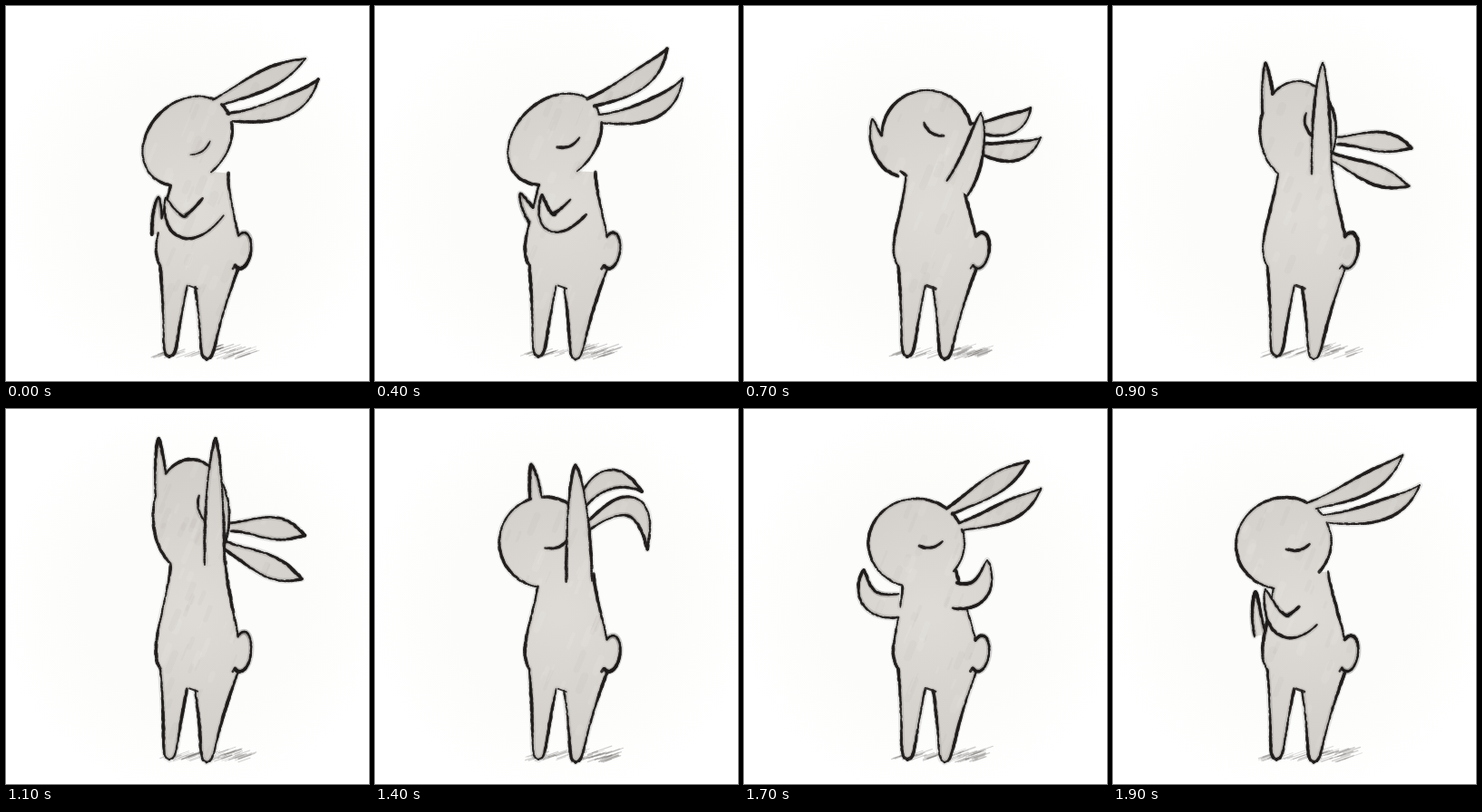
An HTML page with a canvas that plays this animation: 400x414 px, repeating every 2 s.

```html
<!DOCTYPE html>
<html lang="en">
<head>
<meta charset="utf-8">
<title>Stretching rabbit</title>
<style>
html, body { margin: 0; width: 100%; height: 100%; overflow: hidden; background: #fff; }
canvas { display: block; }
</style>
</head>
<body>
<canvas id="stage" width="400" height="414"></canvas>
<script>
const ctx = document.getElementById('stage').getContext('2d');

// head: x, y, radii, tilt    eye: offset from head, angle    neck: x
// earAngle: first ear's place on the head    ears: tip x, y, sag
// arms: shoulder, elbow, hand, width
const praying = {
  head: [200, 149, 55, 43, -0.78], eye: [14, 8, -0.6], neck: [215],
  earAngle: [-1.03], farEar: [330, 58, 2], nearEar: [344, 81, 20],
  farArm: [167, 252, 166, 230, 168, 211, 6], nearArm: [228, 222, 190, 270, 176, 212, 15]
};
const opening = {
  head: [198, 147, 58, 43, -0.75], eye: [15, 4, -0.4], neck: [213],
  earAngle: [-0.95], farEar: [322, 47, 16], nearEar: [339, 80, 24],
  farArm: [178, 238, 168, 226, 160, 207, 7], nearArm: [224, 222, 186, 262, 184, 209, 12]
};
const spread = {
  head: [200, 146, 55, 46, 0.7], eye: [4, -6, 0.1], neck: [206],
  earAngle: [-0.5], farEar: [307, 83, 27], nearEar: [327, 110, 27],
  farArm: [174, 212, 130, 217, 124, 166, 14], nearArm: [238, 212, 272, 207, 281, 155, 16]
};
const reaching = {
  head: [204, 138, 42, 55, 0], eye: [12, -7, 1.3], neck: [212],
  earAngle: [0.24], farEar: [329, 157, -5], nearEar: [326, 199, 2],
  farArm: [172, 125, 170, 95, 168, 63, 7], nearArm: [230, 185, 229, 120, 231, 63, 11]
};
const lowering = {
  head: [187, 147, 50, 50, 0], eye: [13, 2, -0.35], neck: [211],
  earAngle: [-0.72], farEar: [294, 91, -34], nearEar: [300, 155, -55],
  farArm: [178, 112, 177, 88, 172, 61, 7], nearArm: [225, 190, 224, 120, 221, 62, 14]
};
const closing = {
  head: [190, 148, 53, 49, 0], eye: [16, 1, -0.2], neck: [204],
  earAngle: [-0.8], farEar: [313, 58, 2], nearEar: [327, 88, 10],
  farArm: [172, 217, 128, 223, 132, 178, 13], nearArm: [232, 206, 268, 212, 268, 167, 14]
};
const folding = {
  head: [188, 148, 53, 50, -0.4], eye: [16, 4, -0.22], neck: [207],
  earAngle: [-1.05], farEar: [319, 51, 12], nearEar: [338, 84, 18],
  farArm: [162, 250, 157, 228, 157, 202, 6], nearArm: [215, 228, 181, 262, 168, 199, 14]
};

const mix = (a, b, t) => Object.fromEntries(Object.keys(a).map(key =>
  [key, a[key].map((v, i) => v + (b[key][i] - v) * t)]));

// Start time, pose, upward stretch of the body.
const timeline = [
  [0, praying, 1],
  [200, mix(praying, opening, 0.5), 1],
  [400, opening, 1],
  [500, mix(opening, spread, 0.5), 1],
  [600, spread, 1],
  [700, mix(spread, reaching, 0.4), 1],
  [800, mix(spread, reaching, 0.75), 1],
  [900, reaching, 1],
  [1100, reaching, 1.14],
  [1300, mix(reaching, lowering, 0.6), 1.05],
  [1400, lowering, 1],
  [1500, mix(lowering, closing, 0.35), 1],
  [1600, mix(lowering, closing, 0.7), 1],
  [1700, closing, 1],
  [1800, mix(closing, folding, 0.5), 1],
  [1900, folding, 1]
];

function seeded(seed) {
  return () => {
    seed = (seed * 16807) % 2147483647;
    return seed / 2147483647;
  };
}

function bezier(points, t) {
  while (points.length > 1) {
    points = points.slice(1).map((p, i) => p.map((v, k) => points[i][k] + (v - points[i][k]) * t));
  }
  return points[0];
}

// Outline of a limb: a curved spine with a half-width at each t, open at its base.
function tube(spine, halfWidth, steps = 50) {
  const near = [], far = [];
  for (let i = 0; i <= steps; i++) {
    const t = i / steps;
    const [x, y] = bezier(spine, t);
    const [x1, y1] = bezier(spine, t - 0.001), [x2, y2] = bezier(spine, t + 0.001);
    const scale = halfWidth(t) / Math.hypot(x2 - x1, y2 - y1);
    const nx = (y2 - y1) * scale, ny = (x1 - x2) * scale;
    near.push([x + nx, y + ny]);
    far.unshift([x - nx, y - ny]);
  }
  return [...near, ...far];
}

function ellipse(x, y, rx, ry, tilt, steps = 120) {
  return Array.from({ length: steps + 1 }, (_, i) => {
    const a = i / steps * 2 * Math.PI;
    const u = rx * Math.cos(a), v = ry * Math.sin(a);
    return [x + u * Math.cos(tilt) - v * Math.sin(tilt), y + u * Math.sin(tilt) + v * Math.cos(tilt)];
  });
}

function arm([x1, y1, x2, y2, x3, y3, width]) {
  return tube([[x1, y1], [x2, y2], [x3, y3]], t => width * (1 - t * t) ** 0.7);
}

function ear([headX, headY], angle, [tipX, tipY, sag]) {
  const x = headX + 45 * Math.cos(angle), y = headY + 45 * Math.sin(angle);
  const dx = tipX - x, dy = tipY - y, length = Math.hypot(dx, dy);
  const bent = (t, amount) => [x + dx * t - dy / length * amount, y + dy * t + dx / length * amount];
  return tube([[x, y], bent(0.33, sag * 0.7), bent(0.7, sag * 1.2), [tipX, tipY]],
    t => 4 * (1 - t) + 9 * Math.sin(Math.PI * t ** 1.4));
}

function leg(hip, foot, thigh) {
  return tube([hip, foot], t => (7 + thigh * (1 - t) ** 1.5) * (1 - t ** 16) ** 0.5);
}

function eyeLine([headX, headY], [dx, dy, angle]) {
  return Array.from({ length: 14 }, (_, i) => {
    const u = i * 2 - 13, v = 4 - u * u / 40;
    return [headX + dx + u * Math.cos(angle) - v * Math.sin(angle),
      headY + dy + u * Math.sin(angle) + v * Math.cos(angle)];
  });
}

function buildBody(pose) {
  const [neck] = pose.neck, [angle] = pose.earAngle;
  return [
    arm(pose.farArm),
    ear(pose.head, angle, pose.farEar),
    ear(pose.head, angle + 0.42, pose.nearEar),
    ellipse(260, 270, 10, 20, 0.15),
    leg([187, 288], [180, 387], 10),
    leg([230, 288], [221, 390], 19),
    tube([[neck, 182], [211, 230], [211, 312]], t => (30 + 32 * t ** 1.5) * (1 - t ** 8)),
    ellipse(...pose.head)
  ];
}

function segment([x1, y1], [x2, y2], width, color) {
  ctx.lineWidth = width;
  ctx.strokeStyle = color;
  ctx.beginPath();
  ctx.moveTo(x1, y1);
  ctx.lineTo(x2, y2);
  ctx.stroke();
}

function toPath(line) {
  const path = new Path2D();
  line.forEach(([x, y]) => path.lineTo(x, y));
  path.closePath();
  return path;
}

// Charcoal line with uneven pressure and a soft smear, left out where hidden.
function ink(line, random, weight, hidden = () => false) {
  const phase = random() * 6;
  let run = 0;
  for (let i = 1; i < line.length; i++) {
    const [a, b] = [line[i - 1], line[i]];
    run += Math.hypot(b[0] - a[0], b[1] - a[1]);
    if (hidden((a[0] + b[0]) / 2, (a[1] + b[1]) / 2)) continue;
    const pressure = 0.95 + 0.28 * Math.sin(run * 0.06 + phase) + 0.4 * (random() - 0.5);
    const shift = (random() - 0.5) * 0.7;
    const move = ([x, y]) => [x + shift, y - shift];
    segment(a, b, 6.5, 'rgba(60,56,52,.04)');
    segment(move(a), move(b), weight * pressure, 'rgba(32,29,27,.88)');
  }
}

function wash(paths, random) {
  const tone = ctx.createRadialGradient(205, 225, 10, 205, 225, 190);
  tone.addColorStop(0, '#dedbd6');
  tone.addColorStop(1, '#cfccc7');
  const union = new Path2D();
  paths.forEach(path => union.addPath(path));
  ctx.save();
  ctx.fillStyle = tone;
  ctx.fill(union);
  ctx.clip(union);
  for (let i = 0; i < 160; i++) {
    const x = 120 + random() * 230, y = 40 + random() * 350, length = 5 + random() * 16;
    const shade = random() < 0.5 ? 'rgba(255,255,252,.07)' : 'rgba(110,104,98,.045)';
    segment([x, y], [x + length * 0.4, y - length], 1 + random() * 8, shade);
  }
  ctx.restore();
}

function drawPaper() {
  const paper = ctx.createRadialGradient(205, 212, 120, 205, 212, 215);
  paper.addColorStop(0, '#fcfcfa');
  paper.addColorStop(1, '#ffffff');
  ctx.fillStyle = paper;
  ctx.fillRect(0, 0, 400, 414);
}

function drawShadow(random) {
  for (let i = 0; i < 50; i++) {
    const left = i < 18;
    const x = left ? 160 + random() * 45 : 216 + random() * 42;
    const y = left ? 383 + random() * 6 : 379 + random() * 11;
    const length = 8 + random() * 14;
    segment([x, y], [x + length, y - length * 0.35], 0.6 + random(), 'rgba(80,76,72,.26)');
  }
}

function draw(pose, lift, seed) {
  const random = seeded(seed * 7919 + 17);
  const raise = line => line.map(([x, y]) => [x, y < 280 ? 280 - (280 - y) * lift : y]);
  const body = buildBody(pose).map(raise);
  const paths = body.map(toPath);
  const nearArm = raise(arm(pose.nearArm));

  ctx.lineCap = 'round';
  drawPaper();
  drawShadow(random);
  wash(paths, random);
  body.forEach((line, i) => ink(line, random, 2.8, (x, y) =>
    paths.some((path, k) => k !== i && ctx.isPointInPath(path, x, y))));
  ink(raise(eyeLine(pose.head, pose.eye)), random, 2.5);
  wash([toPath(nearArm)], random);
  ink(nearArm, random, 2.7);
}

let shown = -1;
function tick(now) {
  const time = now % 2000;
  const index = timeline.findLastIndex(([start]) => start <= time);
  if (index !== shown) {
    shown = index;
    const [, pose, lift] = timeline[index];
    draw(pose, lift, index + 1);
  }
  requestAnimationFrame(tick);
}
tick(performance.now());
</script>
</body>
</html>
```
